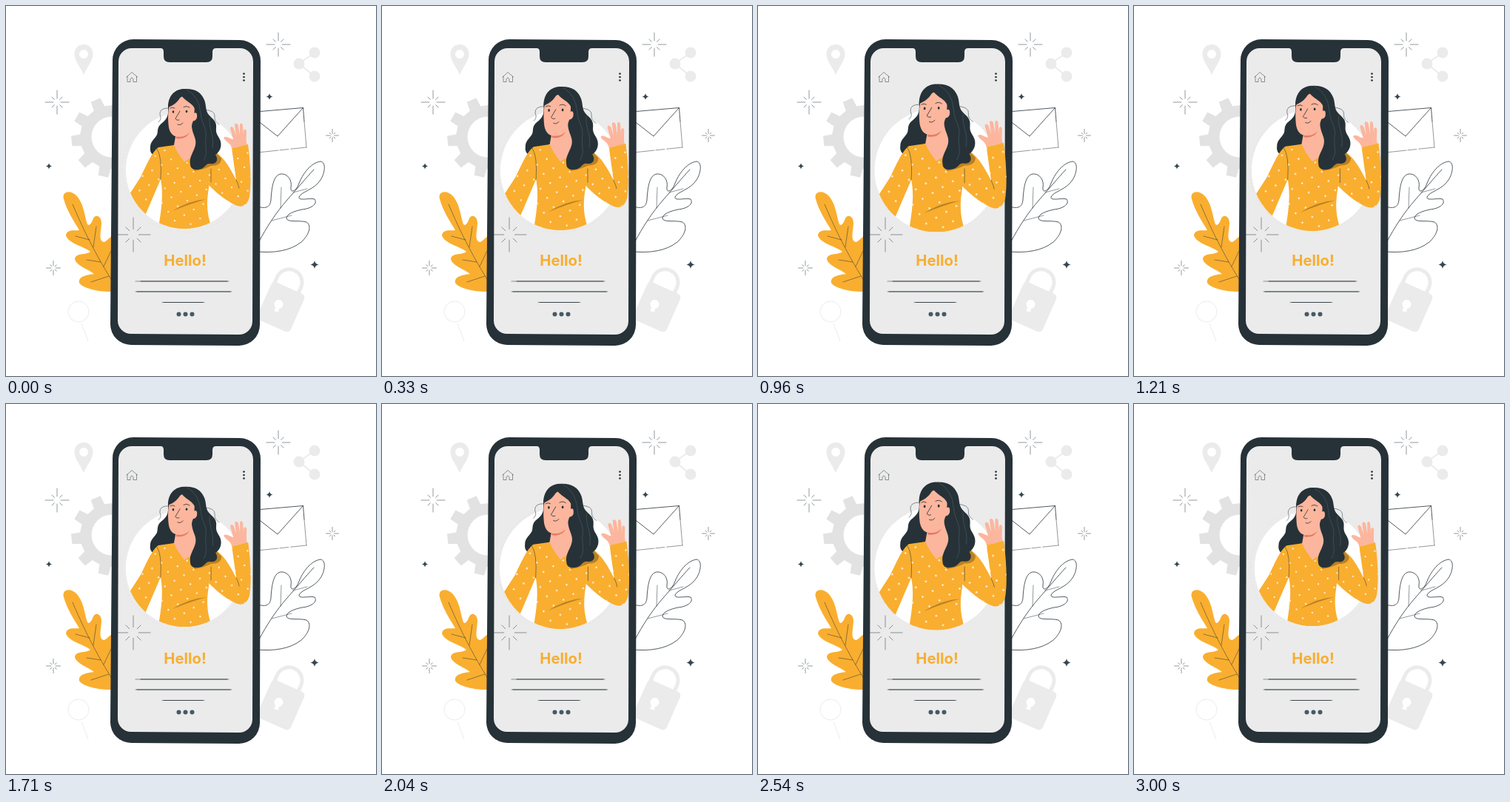
These frames come from a looping animation (500x500 px, 3.04 s). An HTML page:

```html
<!DOCTYPE html>
<html lang="en">
<head>
<meta charset="utf-8">
<style>
  html, body { margin: 0; width: 100%; height: 100%; overflow: hidden; background: #fff; }
  svg { display: block; width: 100%; height: 100%; }
  .line { fill: none; stroke: #263238; stroke-width: .8; stroke-linecap: round; stroke-linejoin: round; }
  .thin { stroke-width: .5; }
  .soft { fill: #ebebeb; }
  .skin { fill: #fcb69d; }
  .dark { fill: #263238; }
  .gold { fill: #f9ae2f; }
  .shade { fill: #b98125; }
</style>
</head>
<body>
<svg viewBox="0 0 500 500">
  <defs>
    <pattern id="dots" width="22" height="20" patternUnits="userSpaceOnUse" patternTransform="translate(3 2) rotate(12)">
      <circle cx="5" cy="5" r="1.1" fill="#fff"/>
      <circle cx="16" cy="15" r="1.1" fill="#fff"/>
    </pattern>
    <clipPath id="round"><path d="M162 222A79 79 0 0 0 320 222V100H162Z"/></clipPath>
    <path id="dress" d="M206 191C197 197 189 217 182 231L160 265L185 290L209 234C212 250 212 266 205 305H280C272 285 270 270 274 246L277 215L284 197L264 191L241 210L227 188Z"/>
    <path id="sleeve" d="M277 195C291 199 301 215 311 235L305 192Q316 190 327 187C330 208 332 240 329 258C326 270 319 273 310 269C295 262 283 251 274 242Z"/>
  </defs>

  <!-- icons around the phone -->
  <path class="soft" fill-rule="evenodd" d="M105 52C97 52 92.5 58 92.5 65C92.5 74 101 83 105 93C109 83 117.5 74 117.5 65C117.5 58 113 52 105 52ZM105 59A6 6 0 1 1 105 71A6 6 0 1 1 105 59Z"/>
  <path id="gear" fill="#e2e2e2"/>
  <circle cx="143" cy="177" r="27.5" fill="#fff"/>
  <g class="soft">
    <path d="M417 63L396 78L417 95" fill="none" stroke="#ebebeb" stroke-width="2"/>
    <circle cx="417" cy="63" r="7.5"/><circle cx="396" cy="78" r="7.5"/><circle cx="417" cy="95" r="7.5"/>
  </g>
  <g transform="rotate(24 375 405)">
    <path d="M351.5 383V373A17.5 17.5 0 0 1 386.5 373V383" fill="none" stroke="#ebebeb" stroke-width="5"/>
    <rect class="soft" x="348" y="380" width="49" height="56" rx="6"/>
  </g>
  <circle cx="368.500" cy="403" r="6" fill="#fff"/>
  <path d="M368 404L365 413" stroke="#fff" stroke-width="5.500"/>
  <g fill="none" stroke="#e6e6e6">
    <circle cx="98" cy="413" r="14" stroke-width=".8"/><path d="M102 429L111 453" stroke-width=".8"/>
  </g>
  <path class="line" d="M326 144L401.5 137.500L403 156M326 144L367 176L401.500 137.500"/>
  <path class="line thin" d="M403 156L406 191"/>
  <path class="line thin" stroke-dasharray="28 2 12 3" d="M340 198L406 191"/>
  <path class="line" d="M340 271C350 274 357 273 358 262C359 246 361 229 371 227C381 226 387 236 385 245C384 253 391 251 395 242C401 226 412 212 425 210C433 211 431 226 425 235C416 249 400 250 396 258C395 264 410 259 417 261C422 268 411 274 400 275C390 277 379 281 379 287C381 293 395 289 406 292C414 297 409 310 399 319C384 331 362 334 340 332"/>
  <path class="line" d="M341 320C352 299 365 279 380 262S404 234 416 221"/>
  <path class="line thin" d="M371 273L372 245M388 252L407 247M359 290L386 283"/>
  <path class="gold" d="M78 261C75 250 87 248 95 256C105 267 106 282 109 292C111 301 116 293 118 287C122 280 129 285 129 293C129 302 125 314 130 318C134 322 137 314 145 310V386C125 387 103 381 99 374C97 364 114 363 119 362C112 356 95 351 93 342C94 333 108 337 114 332C106 325 84 321 81 310C82 301 94 304 99 303C92 291 82 276 78 261Z"/>
  <path class="line thin" d="M90 268C102 296 116 327 143 371M113 316L94 311M118 326L122 298M128 346L109 343M139 365L115 373M132 352L142 331"/>

  <!-- phone -->
  <path class="dark" d="M172 45L316 46A28 28 0 0 1 344 74L343 431A28 28 0 0 1 315 459L169 458A28 28 0 0 1 141 430L144 73A28 28 0 0 1 172 45Z"/>
  <path fill="#ebebeb" d="M170 57H209Q213 57 213 62V68Q213 76 221 76H271Q279 76 279 68V62Q279 57 284 57H316A18 18 0 0 1 334 75L333 426A18 18 0 0 1 315 444L169 443A18 18 0 0 1 151 425L152 75A18 18 0 0 1 170 57Z"/>
  <path class="line thin" d="M163 96L170 89.500L177.500 96M164 95V102.500H168V99Q170 95 172 99V102.500H176.500V95"/>
  <g class="dark"><circle cx="321.500" cy="91.500" r="1.350"/><circle cx="321.500" cy="96" r="1.350"/><circle cx="321.500" cy="100.500" r="1.350"/></g>
  <circle cx="241" cy="222" r="84" fill="none" stroke="#dcdcdc" stroke-width="1" stroke-dasharray="1 4"/>

  <!-- portrait -->
  <g id="portrait">
    <circle cx="241" cy="222" r="79" fill="#fff"/>
    <path class="dark" d="M240 112C226 113 219 123 219 137C220 149 217 153 211 158C203 164 206 169 204 174C200 181 195 183 195 191C194 198 198 204 209 203L262 204L264 140Z"/>
    <g clip-path="url(#round)">
      <use href="#dress" class="gold"/>
      <use href="#dress" fill="url(#dots)"/>
      <path class="shade" d="M225 277Q247 263 271 261Q249 267 225 277Z"/>
    </g>
    <path class="skin" d="M305 192C303 184 297 184 294 178C297 174 303 180 307 180L303 166C303 162 306 162 308 166L311 176L309 161C309 158 313 158 314 162L316 175L316 161C316 157 320 158 320 162L321 176L321 169C322 165 325 166 325 170C325 177 324 183 326 188Z"/>
    <use href="#sleeve" class="gold"/>
    <use href="#sleeve" fill="url(#dots)"/>
    <path class="skin" d="M230 171L227 188Q232 200 241 210Q254 204 263 192L256 160Z"/>
    <path fill="#e87965" d="M230 176Q240 179 248 171Q243 181 230 179Z"/>
    <path class="skin" d="M222 130C218 142 219 156 220 164C222 174 228 178 236 176C245 174 252 167 254 158L255 132L241 121Z"/>
    <path class="shade" d="M251 218L280 194L291 206Q291 216 277 216Q267 221 255 223Z"/>
    <path class="dark" d="M237 121C243 130 254 131 256 142C257 151 251 156 251 163C252 174 258 179 256 188C254 197 247 204 249 214C249 222 258 222 264 220C269 218 270 213 275 213C284 215 288 208 283 201C288 198 292 191 290 183C288 176 283 174 284 165C285 155 279 153 274 147C269 141 271 134 268 127C264 117 256 112 244 112C229 112 221 122 219 137C227 134 232 130 237 121Z"/>
    <path class="skin" d="M254 145Q259 142 258 151Q256 156 252 155Z"/>
    <g class="line">
      <path stroke="#263238" d="M222 138Q225 136 228 138M240 136.500Q244 134 248 137"/>
      <path d="M235 142Q231 149 229 152Q230 155 234 154M232 160Q236 162 239 158"/>
    </g>
    <g class="line thin">
      <path d="M219 138Q207 138 208 147Q211 153 206 157M267 140Q283 141 282 149Q281 156 288 160"/>
      <path d="M204 193Q211 203 209 234M277 220V238M311 235Q314 241 315 246"/>
    </g>
    <path fill="none" stroke="#60717a" stroke-width=".4" d="M244 113Q261 122 263 144C264 160 272 164 270 178C268 190 274 197 267 209M275 151C274 168 282 174 279 192"/>
    <ellipse class="dark" cx="226" cy="143" rx="1.300" ry="1.800"/>
    <ellipse class="dark" cx="244" cy="142.500" rx="1.300" ry="1.800"/>
  </g>

  <text x="242" y="351" text-anchor="middle" fill="#f9ae2f" font-family="Montserrat, Inter, sans-serif" font-size="20.300" font-weight="700">Hello!</text>
  <path class="line" d="M182 372H299M177 386H303M213 400.500H266"/>
  <path class="line thin" d="M175 372H301M175 386H305M211 400.500H268"/>
  <g fill="#455a64"><circle cx="233.500" cy="416.500" r="3"/><circle cx="242.500" cy="416.500" r="3"/><circle cx="251.500" cy="416.500" r="3"/></g>
  <path id="sparkles" class="line thin"/>
  <path id="stars" fill="#37474f"/>
</svg>
<script>
  const byId = id => document.getElementById(id);
  const LOOP = 3040;
  const CENTER = [241, 222.5];
  // [time in ms, strength of the pulse]
  const BEATS = [[0, .1], [208, 0], [542, 1], [1875, 0], [2208, 1], [2540, .7], [3000, 0], [3040, .1]];

  const polar = (x, y, r, a) => `${(x + r * Math.cos(a)).toFixed(2)} ${(y + r * Math.sin(a)).toFixed(2)}`;

  function gear(x, y, teeth, inner, outer) {
    const step = 2 * Math.PI / teeth;
    const points = [];
    for (let i = 0; i < teeth; i++) {
      const a = i * step - .1;
      points.push(polar(x, y, inner, a - step * .29), polar(x, y, outer, a - step * .2),
                  polar(x, y, outer, a + step * .2), polar(x, y, inner, a + step * .29));
    }
    return `M${points.join('L')}Z`;
  }

  function sparkle([x, y, r]) {
    let d = '';
    for (let i = 0; i < 8; i++) {
      const a = i * Math.PI / 4;
      const reach = i % 2 ? r * .62 : r;
      d += `M${polar(x, y, r * .32, a)}L${polar(x, y, reach, a)}`;
    }
    return d;
  }

  function star([x, y, r]) {
    const tips = [0, 1, 2, 3].map(i => {
      const a = i * Math.PI / 2;
      return `Q${polar(x, y, r * .2, a - Math.PI / 4)} ${polar(x, y, r, a)}`;
    });
    return `M${polar(x, y, r, -Math.PI / 2)}${tips.join('')}Z`;
  }

  byId('gear').setAttribute('d', gear(143, 177, 10, 43, 55));
  byId('sparkles').setAttribute('d',
    [[69, 130, 16], [368, 52, 16], [441, 175, 8.5], [64, 354, 9.5], [172, 309, 23]].map(sparkle).join(''));
  byId('stars').setAttribute('d', [[58, 216.5, 4.2], [356, 122.5, 4.5], [417, 349.5, 5.5]].map(star).join(''));

  function pulse(t) {
    const i = BEATS.findIndex(([end]) => end > t);
    const [t0, v0] = BEATS[i - 1];
    const [t1, v1] = BEATS[i];
    return v0 + (v1 - v0) * (t - t0) / (t1 - t0);
  }

  const portrait = byId('portrait');
  const start = performance.now();
  function draw(now) {
    const t = Math.max(0, now - start) % LOOP;
    const scale = (1 + .1 * pulse(t)) / 1.01;
    const [x, y] = CENTER;
    portrait.setAttribute('transform', `translate(${x} ${y}) scale(${scale}) translate(${-x} ${-y})`);
    requestAnimationFrame(draw);
  }
  draw(start);
</script>
</body>
</html>
```
